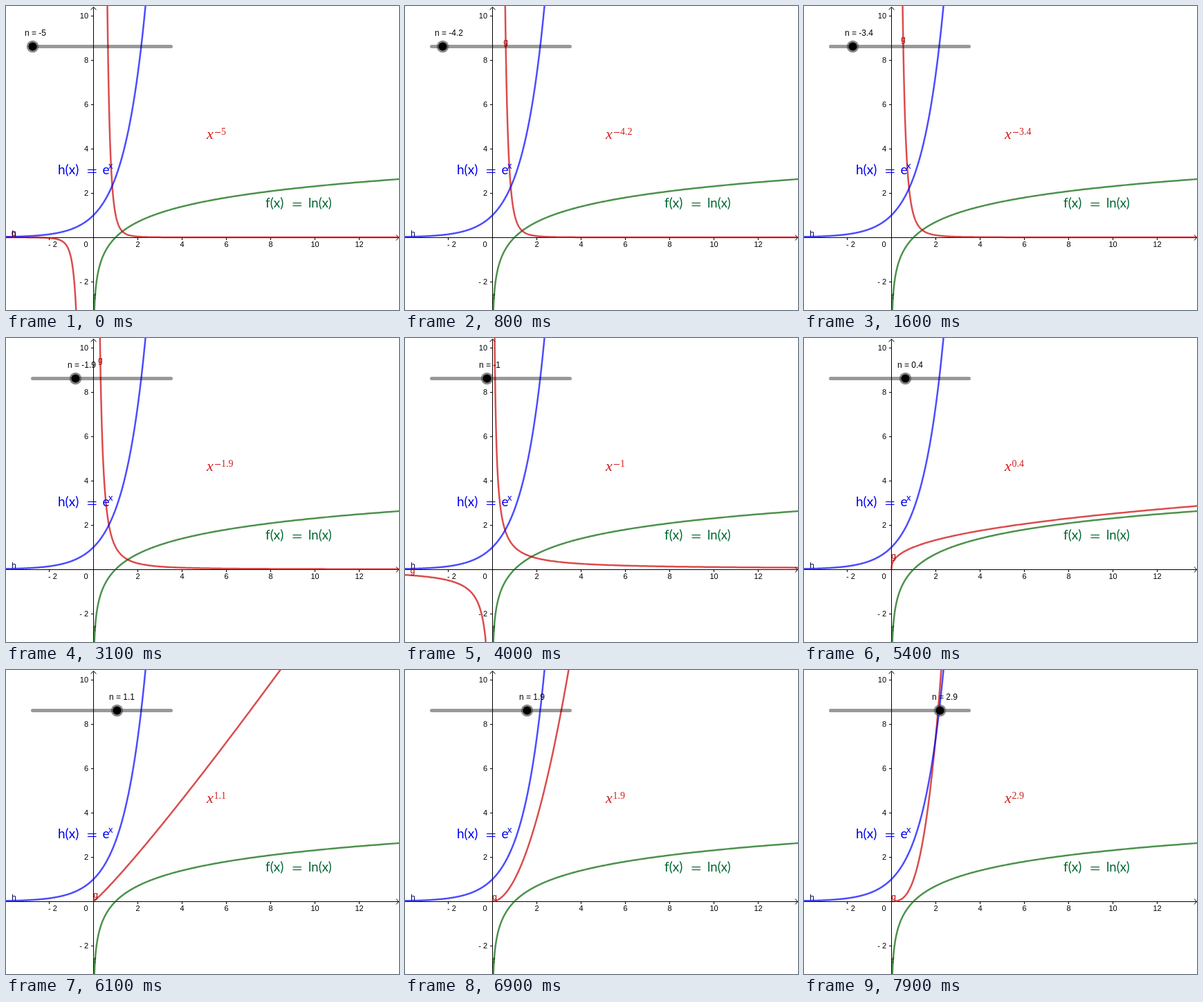
Recreate the animation shown at these times as an HTML page with a canvas. Size 568 by 439 pixels, loop 8 s.

```html
<!DOCTYPE html>
<html lang="en">
<head>
<meta charset="utf-8">
<title>Power, exponential and logarithm</title>
<style>
html, body { margin: 0; width: 568px; height: 439px; overflow: hidden; background: #fff; }
canvas { display: block; }
</style>
</head>
<body>
<canvas id="stage" width="568" height="439"></canvas>
<script>
const W = 568, H = 439, OX = 126.5, OY = 334, UNIT = 32;
const LOOP = 8000, STEP = 100;
const LEFT = -OX / UNIT, RIGHT = (W - OX) / UNIT, TOP = OY / UNIT;
const ARIAL = '"Liberation Sans", Arial, sans-serif';
const SANS = 'Lato, "Open Sans", sans-serif';
const SERIF = '"Liberation Serif", Times, serif';
const ctx = document.getElementById('stage').getContext('2d');

const px = x => OX + x * UNIT;
const py = y => OY - Math.max(-100, Math.min(100, y)) * UNIT;

function text(str, x, y, font, color, align = 'left') {
  ctx.font = font;
  ctx.fillStyle = color;
  ctx.textAlign = align;
  ctx.fillText(str, x, y);
}

function line(color, width, ...p) {
  ctx.strokeStyle = color;
  ctx.lineWidth = width;
  ctx.beginPath();
  for (let i = 0; i < p.length; i += 2) ctx.lineTo(p[i], p[i + 1]);
  ctx.stroke();
}

function curve(fn, color, xAt, steps) {
  ctx.strokeStyle = color;
  ctx.lineWidth = 2.5;
  ctx.lineJoin = 'round';
  ctx.beginPath();
  for (let i = 0; i <= steps; i++) {
    const x = xAt(i / steps);
    ctx.lineTo(px(x), py(fn(x)));
  }
  ctx.stroke();
}

// Dense near zero, where the curves turn vertical
const logX = u => Math.exp(-25 + u * (25 + Math.log(RIGHT + 0.1)));
const evenX = u => LEFT - 0.1 + u * (RIGHT - LEFT + 0.2);

function axes() {
  line('#000', 1, 0, 334.5, W, 334.5);
  line('#000', 1, OX, 2, OX, H);
  line('#000', 1, W - 4, 330.5, W - 0.5, 334.5, W - 4, 338.5);
  line('#000', 1, 122.5, 5.5, OX, 1.5, 130.5, 5.5);
  const font = '11px ' + ARIAL;
  const name = v => v < 0 ? '- ' + -v : '' + v;
  for (let v = -2; v <= 12; v += 2) {
    if (!v) continue;
    const x = Math.floor(px(v)) + 0.5;
    line('#000', 1, x, 335, x, 338);
    text(name(v), v < 0 ? x + 5 : x, 348, font, '#000', 'center');
    if (v > 10) continue;
    const y = py(v) + 0.5;
    line('#000', 1, 123, y, 126, y);
    text(name(v), 119, y + 3.5, font, '#000', 'right');
  }
  text('0', 115.5, 348, font, '#000', 'center');
}

function powerLabel(n) {
  let x, y;
  if (Number.isInteger(n)) {
    x = n > 0 ? Math.max(LEFT, -Math.pow(n % 2 ? 3.2 : TOP - 0.4, 1 / n)) : LEFT;
    y = Math.pow(x, n);
  } else {
    x = n < 0 ? Math.max(0.108, Math.pow(TOP, 1 / n) * (1.08 + 0.008 * n)) : 0.1;
    y = Math.pow(x, n);
  }
  text('g', Math.max(11, px(x)), py(y) - 2, '12px ' + ARIAL, '#b00000', 'center');
}

function power(n) {
  const color = 'rgba(204,0,0,0.7)';
  const fn = x => Math.pow(x, n);
  if (Number.isInteger(n)) curve(fn, color, u => -logX(u), 1500);
  curve(fn, color, logX, 1500);
}

function equals(x, y, color) {
  line(color, 1.2, x, y - 6.5, x + 12.5, y - 6.5);
  line(color, 1.2, x, y - 2.5, x + 12.5, y - 2.5);
}

function formulas(n) {
  const big = '19px ' + SANS, blue = '#0000ee', green = '#006630', red = '#d02020';
  text('h(x)', 75, 243, big, blue);
  equals(118, 243, blue);
  text('e', 139.5, 243, big, blue);
  text('x', 148, 235, '13px ' + SANS, blue);

  text('f(x)', 375, 291, big, green);
  equals(414.5, 291, green);
  text('ln(x)', 437, 291, '18.5px ' + SANS, green);

  text('x', 290, 192, 'italic 22px ' + SERIF, red);
  if (n < 0) line(red, 1, 302, 182.5, 310, 182.5);
  text('' + Math.abs(n), n < 0 ? 311 : 300.5, 186, '14px ' + SERIF, red);
}

function disc(x, y, r, color) {
  ctx.fillStyle = color;
  ctx.beginPath();
  ctx.arc(x, y, r, 0, 7);
  ctx.fill();
}

function slider(n) {
  const x = 38.5 + 20 * (n + 5), y = 58.5;
  ctx.lineCap = 'round';
  line('rgba(0,0,0,0.4)', 5, 38.5, y, 238.5, y);
  ctx.lineCap = 'butt';
  disc(x, y, 8.7, 'rgba(70,70,70,0.65)');
  disc(x, y, 6, '#000');
  text('n = ' + n, x - 11.5, 43, '12px ' + ARIAL, '#000');
}

function draw(ms) {
  const n = (Math.floor(ms % LOOP / STEP) - 50) / 10;
  ctx.fillStyle = '#fff';
  ctx.fillRect(0, 0, W, H);
  axes();
  curve(Math.log, 'rgba(0,100,0,0.7)', logX, 1500);
  power(n);
  curve(Math.exp, 'rgba(0,0,255,0.7)', evenX, 1200);
  text('f', 128.5, 424, '12px ' + ARIAL, '#004d00', 'center');
  powerLabel(n);
  text('h', 11.5, 333, '12px ' + ARIAL, '#000050', 'center');
  formulas(n);
  slider(n);
}

let start;
function tick(now) {
  if (start === undefined) start = now;
  draw(now - start);
  requestAnimationFrame(tick);
}
draw(0);
requestAnimationFrame(tick);
</script>
</body>
</html>
```
